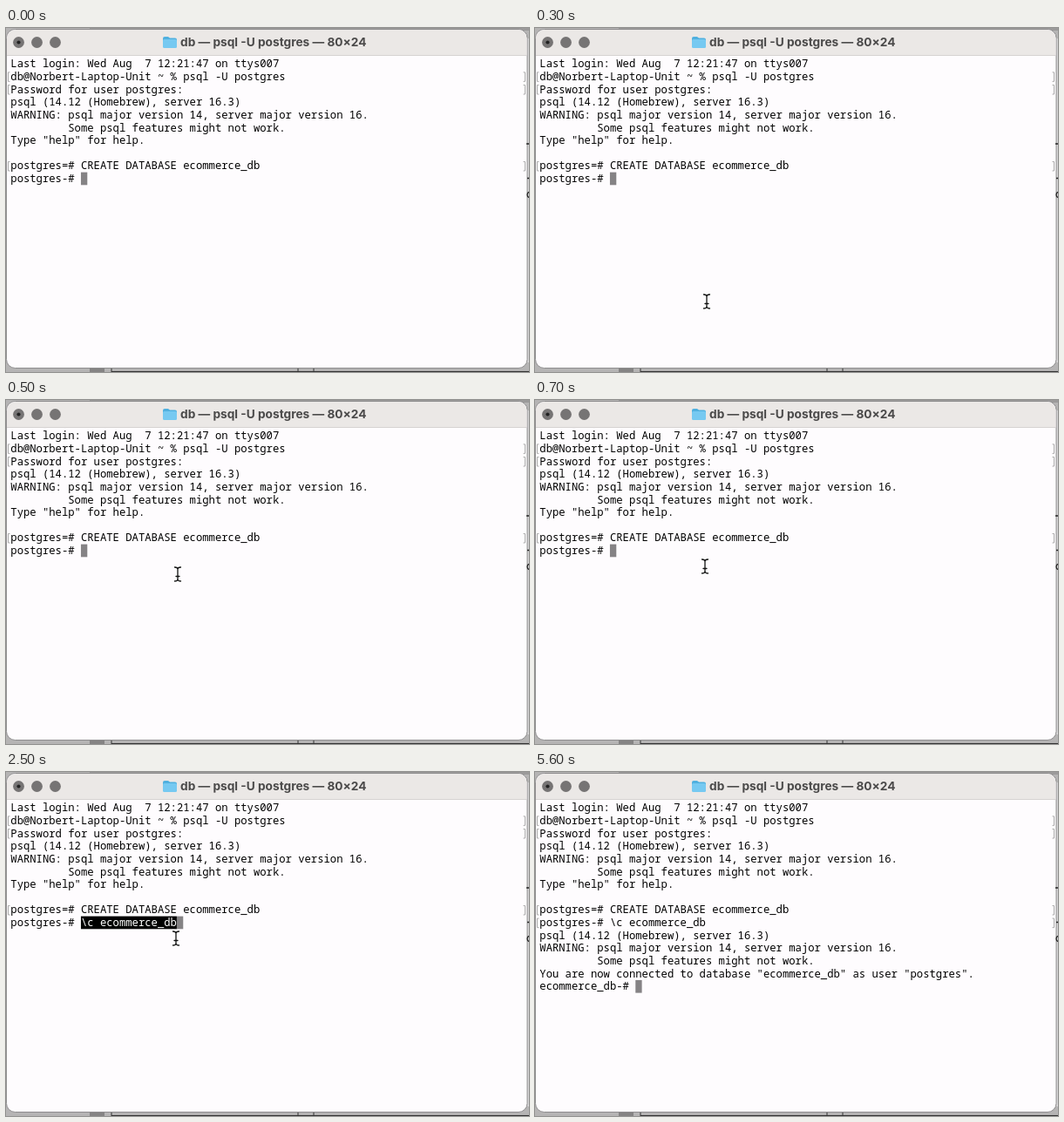
An HTML page that plays this animation: 600x395 px, repeating every 8000 ms.

```html
<!DOCTYPE html>
<html lang="en">
<head>
<meta charset="utf-8">
<title>Terminal</title>
<style>
  html, body { margin: 0; width: 100%; height: 100%; overflow: hidden; background: #b9b8b8; }
  svg { display: block; }
  text { white-space: pre; }
  #rows text { font: 500 12.22px "Noto Sans Mono", "DejaVu Sans Mono", monospace; }
  #title { font: 700 13.7px Inter, "Liberation Sans", sans-serif; fill: #4b4a4a; }
  #marks path { fill: none; stroke: #aaa; }
</style>
</head>
<body>
<svg width="600" height="395" viewBox="0 0 600 395">
  <!-- desktop behind the window -->
  <rect width="600" height="395" fill="#b5b4b4"/>
  <rect x="96" width="504" height="3" fill="#9b9a9a"/>
  <rect x="597" y="12" width="3" height="372" fill="#d3d2d3"/>
  <path d="M96 392.5H113" stroke="#858484" stroke-width="5"/>
  <path d="M121 389V395M121 394.5H600M335 391V395M353 390V395" stroke="#333" fill="none"/>

  <!-- window -->
  <rect x=".5" y="1.5" width="597.5" height="389" rx="10" fill="#fefcfe" stroke="#8f8e8f"/>
  <path d="M1 31V12a10 10 0 0 1 10-10H587.5a10 10 0 0 1 10 10V31Z" fill="#ebe8e6"/>
  <path d="M1 31.5H597.5" stroke="#d6d3d2"/>
  <path d="M597 133H600M598 172.5H600M600 188.500q-2 .5-2 3t2 3" stroke="#222" fill="none" stroke-width="1.3"/>
  <g fill="#767474">
    <circle cx="14.500" cy="16.500" r="6.400"/>
    <circle cx="35.500" cy="16.500" r="6.400"/>
    <circle cx="56.500" cy="16.500" r="6.400"/>
  </g>
  <circle cx="14.500" cy="16.500" r="2.100" fill="#222"/>
  <path d="M180 12q0-2 2-2h4l2 1.500h6q2 0 2 2V20H180Z" fill="#4fb0df"/>
  <rect x="180" y="13" width="16" height="10" rx="1.500" fill="#76c9f1"/>
  <text id="title" x="200" y="21.300">db — psql -U postgres — 80×24</text>

  <rect id="selection" fill="#000"/>
  <rect id="caret" fill="#858385"/>
  <g id="marks"></g>
  <g id="rows"></g>
  <g id="pointer" fill="none" stroke-linecap="round">
    <path d="M-3.500-8Q0-8 0-5.500Q0-8 3.500-8M0-5.500V5.500M-3.500 8Q0 8 0 5.500Q0 8 3.500 8M-2 2.500H2" stroke="#fff" stroke-width="3"/>
    <path d="M-3.500-8Q0-8 0-5.500Q0-8 3.500-8M0-5.500V5.500M-3.500 8Q0 8 0 5.500Q0 8 3.500 8M-2 2.500H2" stroke="#111" stroke-width="1.300"/>
  </g>
</svg>
<script>
const LOOP = 8000, LEFT = 5.3, TOP = 33.7, CHAR = 7.332, LINE = 14.66;
const $ = id => document.getElementById(id);
const colX = c => LEFT + c * CHAR;
const rowY = r => TOP + r * LINE;

const banner = [
  'psql (14.12 (Homebrew), server 16.3)',
  'WARNING: psql major version 14, server major version 16.',
  '         Some psql features might not work.'
];
const prompt = 'postgres-# ', command = '\\c ecommerce_db';
const lines = [
  'Last login: Wed Aug  7 12:21:47 on ttys007',
  'db@Norbert-Laptop-Unit ~ % psql -U postgres',
  'Password for user postgres:',
  ...banner,
  'Type "help" for help.',
  '',
  'postgres=# CREATE DATABASE ecommerce_db',
  prompt,
  ...banner,
  'You are now connected to database "ecommerce_db" as user "postgres".',
  'ecommerce_db-# '
];

function add(parent, tag, attrs) {
  const el = document.createElementNS('http://www.w3.org/2000/svg', tag);
  for (const k in attrs) el.setAttribute(k, attrs[k]);
  return parent.appendChild(el);
}

function label(row, col, str) {
  const el = add($('rows'), 'text', { x: colX(col), y: rowY(row) + 11.5 });
  el.textContent = str;
  return el;
}

// brackets that mark an entered line
function mark(row) {
  const y = rowY(row) + 2.5;
  return add($('marks'), 'path', { d: `M4.5 ${y}H2.5v10.500h2M593.500 ${y}h2v10.500h-2` });
}

function block(el, row, col, count) {
  const box = { x: colX(col), y: rowY(row), width: count * CHAR, height: LINE };
  for (const k in box) el.setAttribute(k, box[k]);
}

const texts = lines.map((str, row) => label(row, 0, str));
const typed = label(9, prompt.length, command);
[1, 2, 8].forEach(mark);
const lastMark = mark(9);
block($('selection'), 9, prompt.length, command.length);

// pointer places, one per 100 ms
const path = [null, [199, 314], [198, 314], [197, 314], [197, 248], [197, 200], [196, 193], [195, 191]];
const show = (el, on) => el.setAttribute('visibility', on ? 'visible' : 'hidden');

function draw(t) {
  const pasted = t >= 2500, sent = t >= 5500, done = t >= 5600;
  texts.forEach((el, row) => show(el, row < 10 || done));
  show(typed, pasted);
  typed.setAttribute('fill', sent ? '#000' : '#fff');
  show($('selection'), pasted && !sent);
  show(lastMark, sent);

  if (done) block($('caret'), 14, lines[14].length, 1);
  else if (sent) block($('caret'), 10, 0, 1);
  else block($('caret'), 9, prompt.length + (pasted ? command.length : 0), 1);

  const at = path[Math.min(Math.floor(t / 100), path.length - 1)];
  show($('pointer'), at && !sent);
  if (at) $('pointer').setAttribute('transform', `translate(${at})`);
}

const start = performance.now();
function tick() {
  draw((performance.now() - start) % LOOP);
  requestAnimationFrame(tick);
}
tick();
</script>
</body>
</html>
```
